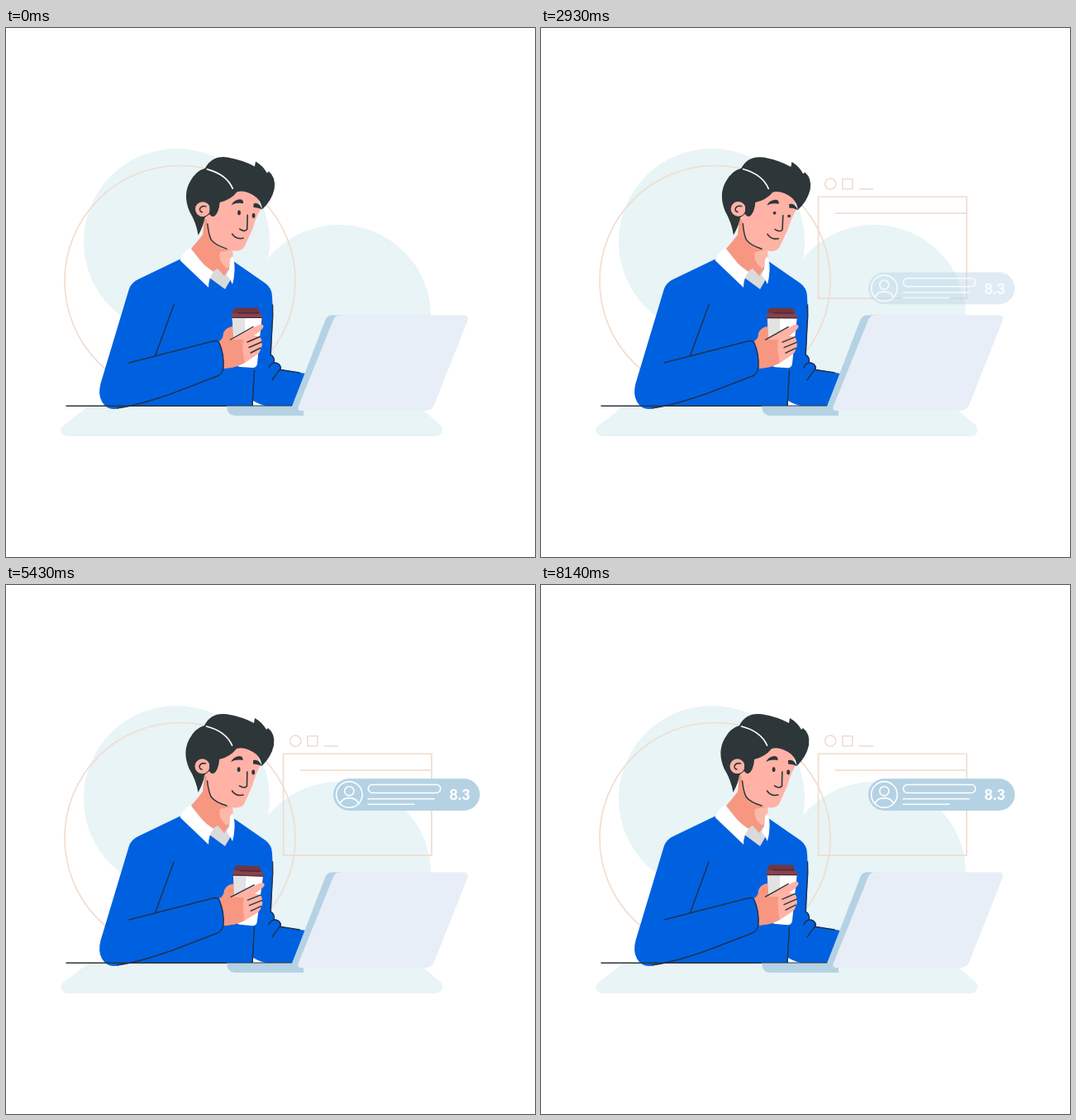
An HTML page with a canvas for the animation above (8210 ms loop, 640 by 640 pixels).

```html
<!DOCTYPE html>
<html lang="en">
<head>
<meta charset="utf-8">
<title>Coffee at the laptop</title>
<style>
html, body { margin: 0; width: 100%; height: 100%; overflow: hidden; background: #fff; }
canvas { display: block; width: 100vw; height: 100vh; }
</style>
</head>
<body>
<canvas id="stage"></canvas>
<script>
const LOOP = 8210, STEP = LOOP / 115;
const CYCLE = 2235, CYCLE_LEAD = 30;
const PALE = '#e8f4f6', BEIGE = '#f0ddd0', BLUE = '#0061e0', NAVY = '#1f3152';
const DARK = '#2d3639', SKIN = '#ffb2a5', SHADE = '#f79782', STEEL = '#b5d2e4';

const canvas = document.getElementById('stage');
const ctx = canvas.getContext('2d');
const ratio = window.devicePixelRatio || 1;
canvas.width = canvas.height = 640 * ratio;

const clamp = v => Math.max(0, Math.min(1, v));
const span = (t, from, to) => clamp((t - from) / (to - from));
const bump = u => Math.sin(Math.PI * u);

function fill(color, d) {
  ctx.fillStyle = color;
  ctx.fill(new Path2D(d));
}

function stroke(color, width, d) {
  ctx.strokeStyle = color;
  ctx.lineWidth = width;
  ctx.stroke(new Path2D(d));
}

function disc(color, x, y, rx, ry = rx) {
  ctx.fillStyle = color;
  ctx.beginPath();
  ctx.ellipse(x, y, rx, ry, 0, 0, 2 * Math.PI);
  ctx.fill();
}

function ring(color, width, x, y, r) {
  ctx.strokeStyle = color;
  ctx.lineWidth = width;
  ctx.beginPath();
  ctx.arc(x, y, r, 0, 2 * Math.PI);
  ctx.stroke();
}

function turned(x, y, degrees, draw) {
  ctx.save();
  ctx.translate(x, y);
  ctx.rotate(degrees * Math.PI / 180);
  ctx.translate(-x, -y);
  draw();
  ctx.restore();
}

// Both ends run from one left corner; dir 1 starts at the top, -1 at the bottom.
function partialBox(x, y, w, h, p, dir) {
  const y0 = dir > 0 ? y : y + h;
  const right = (w + h) * p * 0.975;
  const fall = (w + h) * p * 1.025;
  const across = [[x, y0], [x + Math.min(w, right), y0]];
  if (right > w) across.push([x + w, y0 + dir * (right - w)]);
  const down = [[x, y0 + dir * Math.min(h, fall)]];
  if (fall > h) down.unshift([x + fall - h, y0 + dir * h]);
  [...down, ...across].forEach(([px, py], i) => i ? ctx.lineTo(px, py) : ctx.moveTo(px, py));
  ctx.closePath();
}

function growBox(x, y, w, h, p, weight) {
  ctx.beginPath();
  if (p < 1) {
    partialBox(x, y, w, h, p, 1);
    partialBox(x + weight, y + weight, w - 2 * weight, h - 2 * weight, p, -1);
  } else {
    ctx.rect(x, y, w, h);
    ctx.rect(x + weight, y + weight, w - 2 * weight, h - 2 * weight);
  }
  ctx.fill('evenodd');
}

function growRing(x, y, r, p, weight) {
  const half = Math.PI * p;
  const inner = r - weight;
  ctx.beginPath();
  ctx.arc(x, y, r, Math.PI - 0.35 - half, Math.PI - 0.35 + half);
  ctx.closePath();
  ctx.moveTo(x + inner * Math.cos(0.35 - half), y + inner * Math.sin(0.35 - half));
  ctx.arc(x, y, inner, 0.35 - half, 0.35 + half);
  ctx.closePath();
  ctx.fill('evenodd');
}

function drawBackdrop() {
  disc(PALE, 206.5, 258.5, 112.5);
  disc(PALE, 403, 349, 111);
  ring(BEIGE, 1.6, 210.5, 306, 139.5);
  fill(PALE, 'M99 458 L72 479 Q65 484 67 489 Q69 494 76 494 H519 Q528 494 528 486 Q528 482 523 478 L499 458 Z');
}

function drawPanel(t) {
  const p = span(t, 20, 2920);
  if (!p) return;
  ctx.fillStyle = BEIGE;
  growBox(334.7, 203.4, 181, 124.6, p, 1.7);
  growBox(364, 182, 13.6, 13.6, p, 1.6);
  growRing(350.2, 188.6, 7.4, p, 1.6);
  const reach = Math.min(1, p * 1.45);
  ctx.fillRect(356, 223.3, 158 * reach, 1.7);
  ctx.fillRect(385, 194, 17 * reach, 1.6);
}

function drawScoreCard(t) {
  const u = span(t, 2600, 3700);
  if (!u) return;
  const shown = 1 - (1 - u) ** 1.5;
  ctx.save();
  ctx.globalAlpha = shown;
  ctx.translate(0, 104 * (1 - shown));
  ctx.fillStyle = STEEL;
  ctx.beginPath();
  ctx.roundRect(396, 234.3, 177.3, 38.6, 19.3);
  ctx.fill();
  ctx.globalAlpha = Math.min(1, shown * 2);
  ring('#fff', 1.6, 415.3, 253.6, 15.7);
  ring('#fff', 1.6, 415.3, 249.3, 5.6);
  stroke('#fff', 1.6, 'M404 264.5 Q407 257.6 415.3 257.6 Q423.6 257.6 426.6 264.5');
  ctx.beginPath();
  ctx.roundRect(438.3, 241.5, 87.4, 10, 5);
  ctx.stroke();
  stroke('#fff', 1.5, 'M438 258.8 H518 M438 265.2 H494');
  ctx.fillStyle = '#fff';
  ctx.font = 'bold 18px "Liberation Sans", Arial, sans-serif';
  ctx.fillText('8.3', 536.5, 260.3);
  ctx.restore();
}

function drawBody() {
  fill(BLUE, 'M212 279 L160 304 Q151 308 148.5 317 L114.5 430 Q111 443 116 452 Q121 461 131 461 L147 458 H299 V451 Q309 457 321 458 H346 L362 418 L333 413 Q334 406 325 404 Q325 397 321 395 L323 345 L322 325 Q322 315 314 309 L275 282 L264 300 Z');
  fill(SHADE, 'M240 228 L238 250 Q231 259 224 267 L247 296 L264 300 L274 284 V266 Z');
  fill('#fcb9aa', 'M274 268 L275 279 L268 291 Q256 283 259 271 Z');
  fill('#dadada', 'M247 297 L256 291 L264 300 L269 292 L272 304 L265 316 L246 302 Z');
  fill('#fff', 'M223 266 Q214 271 210.5 281 L245 314 Q245 303 251 295 Q234 284 223 266 Z');
  fill('#fff', 'M274 276 Q277 283 276.5 294 Q276 303 274 310 Q271 303 267 299 Q271 291 271 280 Z');
  stroke(NAVY, 1.5, 'M203 335 L180 398 M322.5 335 L322.7 348 L320 395 Q326 399 324 405 Q332 405 332 412 Q329 416 322 426 M324 405 Q319 407 318 411 M332 413.5 L355 417 M300.5 414 L298 457');
  stroke(DARK, 1.5, 'M73 457.3 H346');
}

function drawHand(tilt) {
  turned(258, 398, tilt, () => {
    fill(SHADE, 'M256 380 Q263 377 263 369 Q266 362 274 361 L278 374 L291 372 V405 Q279 411 262 412 Z');
    fill('#fff', 'M273.5 350 H309.5 L304 406 Q303.5 411 298 411 L283 410 Q278 409 277.5 402 Z');
    fill('#e2e2e2', 'M273.5 350 H289 V371 L276 379 Z');
    fill('#71363f', 'M277 338.5 H304 Q306 339 306.5 345 H274 Q275 339 277 338.5 Z');
    fill('#84434f', 'M274 345 H308 Q310 347 310.3 351 H272 Q272 347 274 345 Z');
    stroke('#4c252e', 1.2, 'M273 350.5 H309.5 M281 344.8 H306');
    fill(SHADE, 'M263 378 L273 375 L288 371 L289 405 Q279 411 262 412 Z');
    fill(SKIN, 'M271 377 L302 361 Q311 356 311.5 361 Q311 365 300 372 L305 373 Q310 375 309 380 Q311 384 308 388 Q308 393 301 397 L289 405 Q285 388 287 377 Z');
    stroke(DARK, 1.4, 'M271.5 377 L299 361.5 M292 380 L307 373.5 M294 386.5 L309 380 M296 393 L308 387');
  });
}

function drawSleeve() {
  fill(BLUE, 'M149 405 L249 379 Q256 377 258 381 Q264 395 263 412 Q262 418 256 420 L160 450 Z');
  stroke(NAVY, 1.5, 'M149 405 L249 379.3 Q256 377 258 381 Q264 395 263 411 Q262 418 256 421 L200 442.5 Q158 457 134 460');
}

function drawHead(tilt, blink) {
  turned(255, 268, tilt, () => {
    fill(SKIN, 'M241 212 L275 192 L302 198 L308 218 Q302 228 298 243 L289 263 Q286 270 277 269.5 L262 267 Q245 262 243 238 Z');
    fill(DARK, 'M232.5 251 Q230 236 221.5 222 Q213 202 222 186 Q229 173 240 170 Q248 154 267 156.3 Q286 159.5 300 167 L301 161 Q310 166 315 175 L317 173 Q326 180 324 194 Q321 208 309.5 219 Q309 211 303 205 Q290 195 279 198 Q271 208 258 211 Q257 225 251 228 Q247 228 246 225 L240 230 Q239 239 232.5 251 Z');
    disc(SKIN, 237.5, 219.3, 9);
    fill(DARK, 'M246 212 L258 209 Q257 224 251 228 Q246 228 246 222 Z');
    stroke(DARK, 1.5, 'M241.5 216 Q236 214.5 234 219 Q234 223 237 223 M243.5 237 Q245 250 248 256 Q253 263 267 267');
    stroke('#fff', 1.7, 'M242.5 171 Q266 177 273.5 194');
    fill(DARK, 'M272 214 Q275 208 282 207 Q287 207 286.5 212 Q279 210.5 272 214 Z');
    fill(DARK, 'M299 212 Q306 210 309.5 219 Q305 216.5 299 216.5 Z');
    disc(DARK, 281.6, 223.2, 1.9, 2.9 * blink);
    disc(DARK, 299.2, 226.5, 1.9, 2.9 * blink);
    stroke(DARK, 1.6, 'M291.8 226 L291.5 243 Q289 247 282.5 243 M273.5 249 Q278 256 287 254');
  });
}

function drawLaptop() {
  fill(STEEL, 'M267 457.5 H360 V469 H277 Q268 469 267 457.5 Z');
  fill(STEEL, 'M346 458 L386 354 Q388 348 394 347.5 H406 L362 463 H352 Z');
  fill('#e8eef7', 'M403 347.5 H555 Q560 348 558.5 354 L518 456 Q515 463 508 463 H356 Q352 462 354 457 L396 353 Q398 348 403 347.5 Z');
}

function render(time) {
  const t = Math.floor(time % LOOP / STEP + 0.1) * STEP;
  const phase = (t + CYCLE_LEAD) % CYCLE;
  const nod = 4.4 * bump(span(phase, 0, 800));
  const sip = 2.1 * bump(span(phase, 600, 1560)) ** 2;
  const blink = 1 - 0.9 * bump(span(phase, 690, 930));

  ctx.setTransform(ratio, 0, 0, ratio, 0, 0);
  ctx.fillStyle = '#fff';
  ctx.fillRect(0, 0, 640, 640);
  ctx.lineCap = ctx.lineJoin = 'round';
  drawBackdrop();
  drawPanel(t);
  drawScoreCard(t);
  drawBody();
  drawHand(sip);
  drawSleeve();
  drawHead(nod, blink);
  drawLaptop();
}

const start = performance.now();
function tick() {
  render(performance.now() - start);
  requestAnimationFrame(tick);
}
tick();
</script>
</body>
</html>
```
